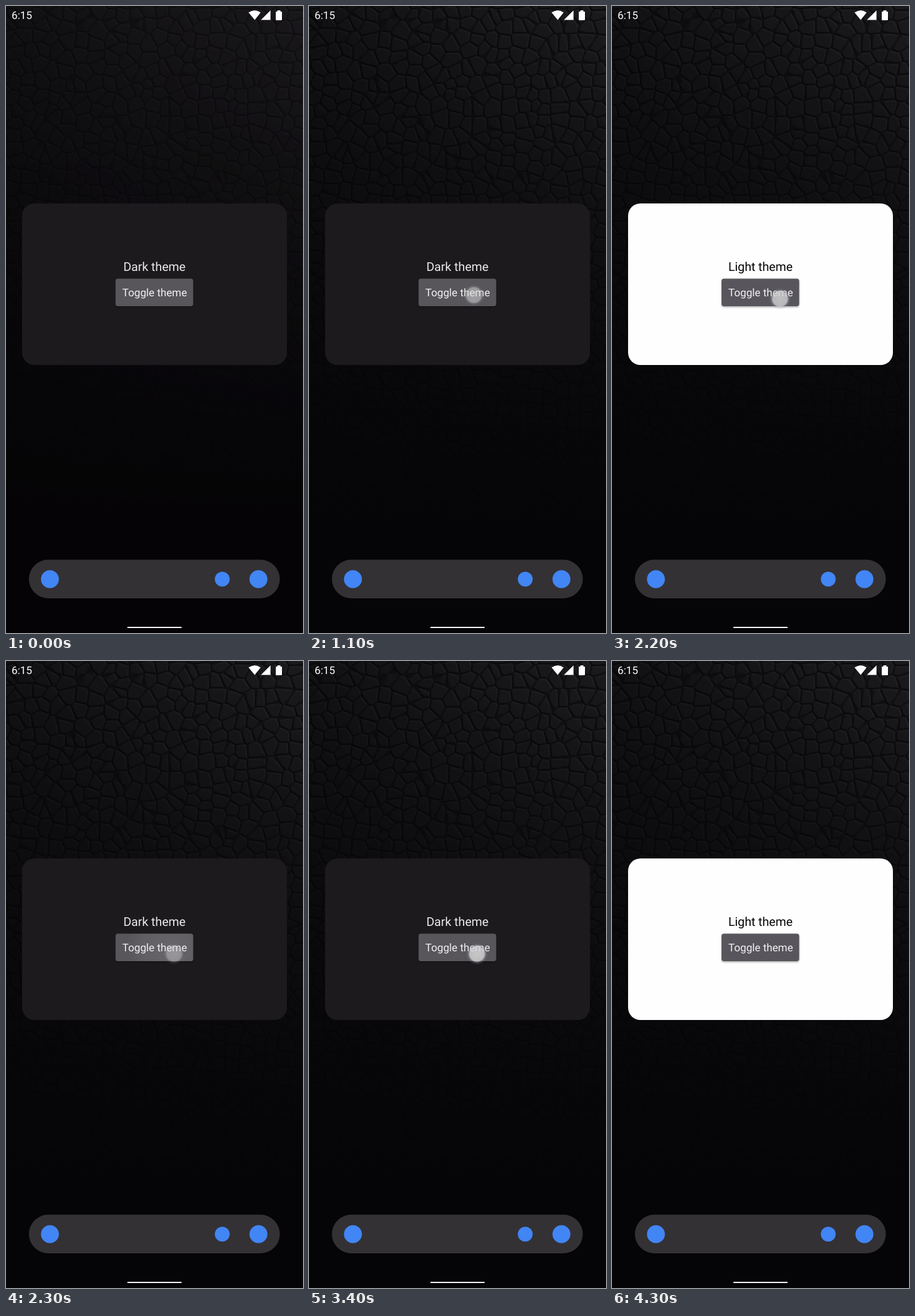
An HTML page with a canvas that plays this animation: 480 by 1013 pixels, repeating every 4600 ms.

```html
<!DOCTYPE html>
<html lang="en">
<head>
<meta charset="utf-8">
<title>Theme toggle widget</title>
<style>
  html, body { margin: 0; width: 100%; height: 100%; overflow: hidden; background: #060407; }
  canvas, svg { position: absolute; left: 0; top: 0; width: 100%; height: 100%; display: block; }
  text { font-family: Roboto, "Open Sans", sans-serif; text-rendering: geometricPrecision; }
  .title { font-size: 19.7px; text-anchor: middle; }
  .caption { font-size: 17.2px; text-anchor: middle; fill: #f1f0f2; }
  #light, #dot, #ripple { opacity: 0; }
</style>
</head>
<body>
<canvas id="plain" width="480" height="1013"></canvas>
<canvas id="leather" width="480" height="1013"></canvas>
<svg viewBox="0 0 480 1013" preserveAspectRatio="none">
  <defs>
    <radialGradient id="glow">
      <stop offset="0" stop-color="#fff" stop-opacity=".16"/>
      <stop offset=".6" stop-color="#fff" stop-opacity=".1"/>
      <stop offset="1" stop-color="#fff" stop-opacity="0"/>
    </radialGradient>
    <radialGradient id="touch">
      <stop offset="0" stop-color="#dcdcdc" stop-opacity=".84"/>
      <stop offset=".7" stop-color="#d4d4d6" stop-opacity=".82"/>
      <stop offset=".78" stop-color="#a9acb8" stop-opacity=".36"/>
      <stop offset="1" stop-color="#8a90a8" stop-opacity="0"/>
    </radialGradient>
    <filter id="shadow" x="-10%" y="-20%" width="120%" height="150%">
      <feDropShadow dx="0" dy="1.5" stdDeviation="1.5" flood-opacity=".35"/>
    </filter>
    <clipPath id="edge"><rect x="177" y="440.5" width="125.5" height="44.5" rx="4"/></clipPath>
  </defs>

  <!-- status bar -->
  <g fill="#fff">
    <text x="9" y="21" font-size="17.2">6:15</text>
    <path d="M402 22.5 392 10.5Q402 3.5 411.5 10.5Z"/>
    <path d="M412 22.5H427.5V7Z"/>
    <path d="M438.500 9V7H443.500V9H445Q446 9 446 10V22Q446 23 445 23H437Q436 23 436 22V10Q436 9 437 9Z"/>
  </g>

  <!-- widget -->
  <g id="dark">
    <rect x="26" y="319" width="428" height="261" rx="20" fill="#1c1a1d"/>
    <text class="title" x="240" y="428" fill="#ebeaec">Dark theme</text>
    <rect x="177" y="440.5" width="125.5" height="44.5" rx="4" fill="#58565a" filter="url(#shadow)"/>
  </g>
  <g id="light">
    <rect x="26" y="319" width="428" height="261" rx="20" fill="#fefefe"/>
    <text class="title" x="240" y="428" fill="#050505">Light theme</text>
    <rect x="177" y="440.5" width="125.5" height="44.5" rx="4" fill="#59575b" filter="url(#shadow)"/>
  </g>
  <g clip-path="url(#edge)"><circle id="ripple" cx="262" cy="465" r="70" fill="url(#glow)"/></g>
  <text class="caption" x="240.3" y="469">Toggle theme</text>
  <g id="dot"><circle r="17.5" fill="url(#touch)"/></g>

  <!-- search bar -->
  <rect x="37" y="894.5" width="405.5" height="62.5" rx="31.25" fill="#333134"/>
  <g fill="#4285f4">
    <circle cx="71" cy="926" r="14.5"/>
    <circle cx="349.5" cy="926" r="12"/>
    <circle cx="408" cy="926" r="14.5"/>
  </g>
  <rect x="196" y="1002.9" width="88" height="2.2" rx="1.1" fill="#f4f4f4"/>
</svg>
<script>
const W = 480, H = 1013, LOOP = 4600, CELL = 22;
const $ = id => document.getElementById(id);
const clamp = v => Math.max(0, Math.min(1, v));

const noise = (i, j, k) => {
  const s = Math.sin(i * 127.1 + j * 311.7 + k * 74.7) * 43758.5453;
  return s - Math.floor(s);
};

// Jittered cell centres, kept on a grid with a margin.
const COLS = Math.ceil(W / CELL) + 4, ROWS = Math.ceil(H / CELL) + 4;
const px = new Float32Array(COLS * ROWS), py = new Float32Array(COLS * ROWS);
for (let j = 0; j < ROWS; j++) for (let i = 0; i < COLS; i++) {
  px[j * COLS + i] = (i - 2 + 0.05 + 0.9 * noise(i, j, 1)) * CELL;
  py[j * COLS + i] = (j - 2 + 0.05 + 0.9 * noise(i, j, 2)) * CELL;
}

// Height of the leather: 0 in a crease, 1 on top of a cell.
function heightAt(x, y) {
  const ci = Math.floor(x / CELL) + 2, cj = Math.floor(y / CELL) + 2;
  let a = 1e9, b = 1e9;
  for (let j = cj - 1; j <= cj + 1; j++) for (let i = ci - 1; i <= ci + 1; i++) {
    const k = j * COLS + i, dx = px[k] - x, dy = py[k] - y, d = dx * dx + dy * dy;
    if (d < a) { b = a; a = d; } else if (d < b) b = d;
  }
  const t = clamp((Math.sqrt(b) - Math.sqrt(a)) / 5);
  return t * t * (3 - 2 * t);
}

const heights = new Float32Array(W * H);
for (let y = 0; y < H; y++) for (let x = 0; x < W; x++) heights[y * W + x] = heightAt(x, y);
const sample = (x, y) =>
  heights[Math.max(0, Math.min(H - 1, y)) * W + Math.max(0, Math.min(W - 1, x))];

function paint(canvas, relief) {
  const ctx = canvas.getContext("2d"), img = ctx.createImageData(W, H);
  for (let y = 0; y < H; y++) for (let x = 0; x < W; x++) {
    const base = 4 + 17 * Math.pow(clamp(1 - y / 850), 1.3) * (0.65 + 0.5 * x / W);
    const depth = relief * clamp(1.15 - y / 900);
    const slope = sample(x - 1, y + 1) - sample(x + 1, y - 1);
    const v = base * (1 + depth * (0.5 * slope - 0.4 * (1 - sample(x, y)) + 0.08));
    const o = (y * W + x) * 4;
    img.data[o] = v + 1;
    img.data[o + 1] = v;
    img.data[o + 2] = v + 2.5;
    img.data[o + 3] = 255;
  }
  ctx.putImageData(img, 0, 0);
}
paint($("plain"), 0);
paint($("leather"), 1);

// Each step is [ms, value] and holds until the next one.
function play(id, prop, steps) {
  const frames = steps.map(([ms, value]) => ({ offset: ms / LOOP, [prop]: value, easing: "step-end" }));
  frames.push({ offset: 1, [prop]: steps[steps.length - 1][1] });
  $(id).animate(frames, { duration: LOOP, iterations: Infinity });
}

play("leather", "opacity", [[0, 0.6], [100, 0.68], [200, 0.76], [300, 0.84], [400, 0.9], [500, 0.95], [600, 1]]);
play("dark", "opacity", [[0, 1], [1200, 0], [2300, 1], [3500, 0]]);
play("light", "opacity", [[0, 0], [1200, 1], [2300, 0], [3500, 1]]);
play("dot", "transform", [[0, "translate(266.5px, 467px)"], [1300, "translate(271.5px, 473px)"]]);
play("dot", "opacity", [
  [0, 0], [1100, 0.65], [1200, 0.25], [1300, 0],
  [2100, 0.6], [2200, 0.95], [2300, 0.5], [2400, 0],
  [3300, 0.6], [3400, 1], [3500, 0.4], [3600, 0]
]);
play("ripple", "opacity", [
  [0, 0], [1200, 1], [1300, 0.5], [1400, 0.2], [1500, 0],
  [2300, 0.6], [2400, 0],
  [3500, 1], [3600, 0.5], [3700, 0.2], [3800, 0]
]);
</script>
</body>
</html>
```
